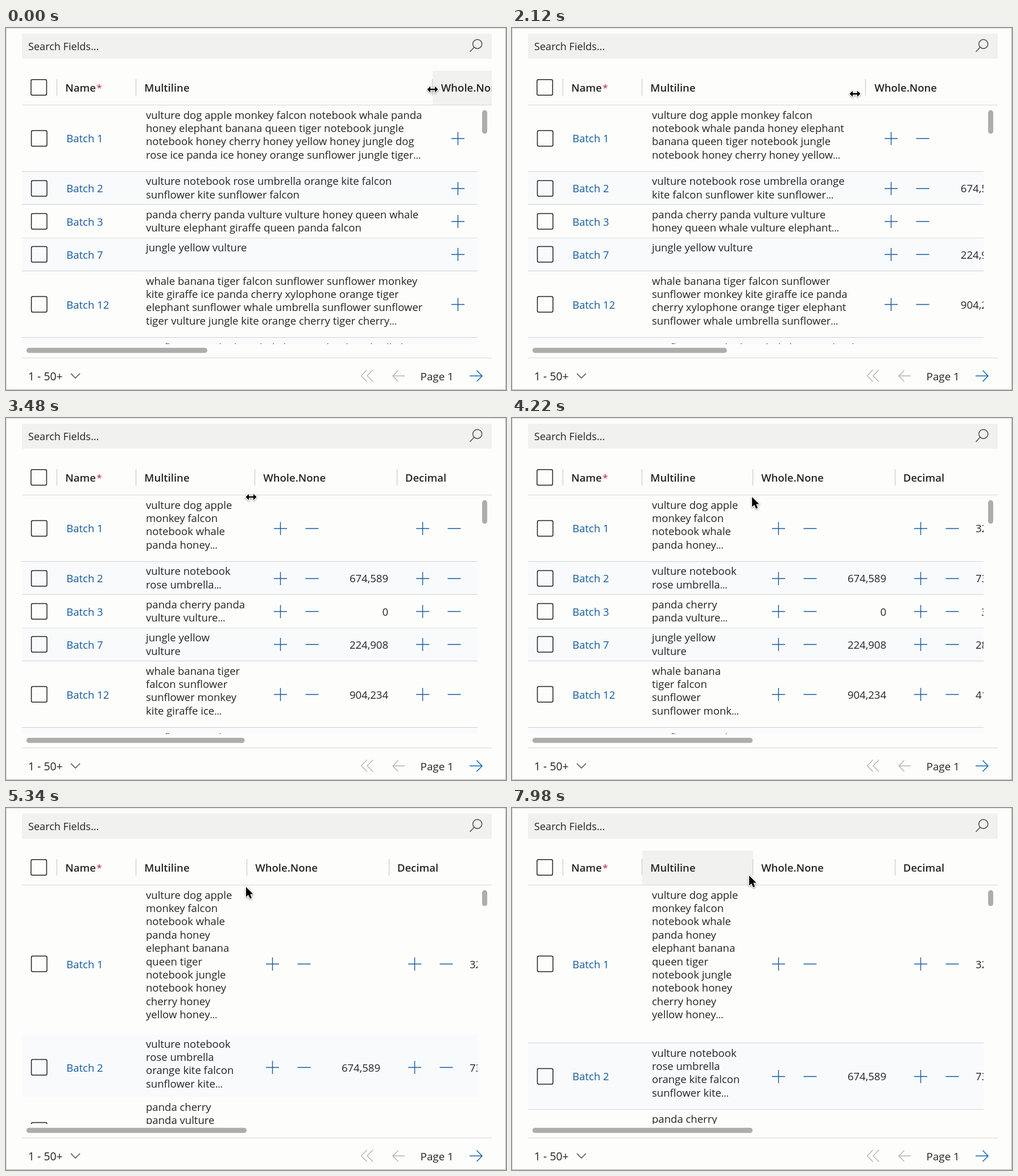
Write an HTML page with a canvas that moves like this. It is 879 px wide and 637 px high and loops after 8 s.

```html
<!DOCTYPE html>
<html lang="en">
<head>
<meta charset="utf-8">
<title>Resizable grid column</title>
<style>
  html, body { margin: 0; width: 100%; height: 100%; overflow: hidden; background: #fdfdfc; }
  canvas { display: block; }
</style>
</head>
<body>
<canvas id="stage" width="879" height="637"></canvas>
<script>
const ctx = document.getElementById('stage').getContext('2d');
const LOOP = 8000, EXPAND_AT = 4716, EXPAND_MS = 1000, ARROW_AT = 3950;
const INK = '#242424', BLUE = '#135a9e', GREY = '#b4b4b4', HOVER = '#f1f1ef';
const LINE = '#cdd3cf', THUMB = '#adadab';
const SIZE = 18.55, LEADING = 23.4, ROW_TOP = 136;
const font = (size = SIZE, weight = 400) => `${weight} ${size}px "Open Sans", "Noto Sans", sans-serif`;

// lines and height: [collapsed, expanded]
const rows = [
  { name: 'Batch 1', lines: [4, 10], height: [116.9, 278], whole: '', decimal: '32',
    words: 'vulture dog apple monkey falcon notebook whale panda honey elephant banana queen tiger notebook jungle notebook honey cherry honey yellow honey jungle dog rose ice panda ice honey orange sunflower jungle tiger umbrella notebook' },
  { name: 'Batch 2', lines: [2, 4], height: [58.4, 116.9], whole: '674,589', decimal: '73',
    words: 'vulture notebook rose umbrella orange kite falcon sunflower kite sunflower falcon' },
  { name: 'Batch 3', lines: [2, 4], height: [58.4, 116.9], whole: '0', decimal: '3', inset: 10,
    words: 'panda cherry panda vulture vulture honey queen whale vulture elephant giraffe queen panda falcon' },
  { name: 'Batch 7', lines: [2, 2], height: [58.4, 58.4], whole: '224,908', decimal: '28',
    words: 'jungle yellow vulture' },
  { name: 'Batch 12', lines: [4, 10], height: [116.9, 278], whole: '904,234', decimal: '41',
    words: 'whale banana tiger falcon sunflower sunflower monkey kite giraffe ice panda cherry xylophone orange tiger elephant sunflower whale umbrella sunflower sunflower tiger vulture jungle kite orange cherry tiger cherry sunflower notebook' },
  { name: 'Batch 14', lines: [4, 10], height: [116.9, 278], whole: '318,402', decimal: '56',
    words: 'sunflower jungle dog whale kite notebook umbrella kite yellow panda honey' }
];

// [time, x, y] of the pointer
const drag = [
  [1300, 750, 108], [1460, 731.5, 108], [1560, 712, 109], [2540, 521.5, 121],
  [2640, 509, 123], [3380, 437.5, 138], [3480, 431, 139], [3800, 423, 139],
  [3940, 422, 139], [7560, 422, 139], [7900, 417, 119]
];

function pointerAt(t) {
  if (t <= drag[0][0]) return drag[0].slice(1);
  for (let i = 1; i < drag.length; i++) {
    const [t0, x0, y0] = drag[i - 1], [t1, x1, y1] = drag[i];
    if (t <= t1) {
      const k = (t - t0) / (t1 - t0);
      return [x0 + (x1 - x0) * k, y0 + (y1 - y0) * k];
    }
  }
  return drag[drag.length - 1].slice(1);
}

// cubic-bezier(.25, .1, .25, 1)
function ease(x) {
  if (x <= 0) return 0;
  if (x >= 1) return 1;
  const curve = (s, a, b) => 3 * s * (1 - s) * (1 - s) * a + 3 * s * s * (1 - s) * b + s ** 3;
  let lo = 0, hi = 1;
  for (let i = 0; i < 24; i++) {
    const mid = (lo + hi) / 2;
    if (curve(mid, .25, .25) < x) lo = mid; else hi = mid;
  }
  return curve(lo, .1, 1);
}

function text(str, x, y, color = INK, f = font(), align = 'left') {
  ctx.font = f;
  ctx.fillStyle = color;
  ctx.textAlign = align;
  ctx.fillText(str, x, y);
}

function rect(x, y, w, h, color) {
  ctx.fillStyle = color;
  ctx.fillRect(x, y, w, h);
}

function path(color, width, ...lines) {
  ctx.beginPath();
  for (const pts of lines)
    for (let i = 0; i < pts.length; i += 2) ctx[i ? 'lineTo' : 'moveTo'](pts[i], pts[i + 1]);
  ctx.strokeStyle = color;
  ctx.lineWidth = width;
  ctx.stroke();
}

function pill(x, y, w, h) {
  ctx.beginPath();
  ctx.roundRect(x, y, w, h, Math.min(w, h) / 2);
  ctx.fillStyle = THUMB;
  ctx.fill();
}

function clipped(x, y, w, h, draw) {
  ctx.save();
  ctx.beginPath();
  ctx.rect(x, y, w, h);
  ctx.clip();
  draw();
  ctx.restore();
}

function checkbox(cx, cy) {
  ctx.beginPath();
  ctx.roundRect(cx - 13.7, cy - 13.7, 27.4, 27.4, 2.5);
  ctx.strokeStyle = '#222';
  ctx.lineWidth = 1.5;
  ctx.stroke();
}

function stepper(x, y) {
  path(BLUE, 1.4, [x + 34, y, x + 57, y], [x + 45.5, y - 11.5, x + 45.5, y + 11.5], [x + 89.5, y, x + 112.5, y]);
}

const measure = s => ctx.measureText(s).width;

function wrap(words, div, max) {
  ctx.font = font();
  const room = div - 14.5 - 246, lines = [];
  let line = '';
  for (const word of words.split(' ')) {
    const next = line ? line + ' ' + word : word;
    if (line && measure(next) > room) {
      lines.push(line);
      line = word;
    } else line = next;
  }
  lines.push(line);
  if (lines.length <= max) return { lines, cut: false };
  let last = lines[max - 1];
  while (last && measure(last) + 13.5 > room - 3) last = last.slice(0, -1);
  return { lines: [...lines.slice(0, max - 1), last], cut: true };
}

function drawRow(row, i, top, height, full, lineMax, div) {
  const mid = top + full / 2, rowY = Math.round(mid - .6) + .5, edge = Math.floor(div);
  if (i % 2) rect(28, top, 801, height, '#f8fafc');
  checkbox(58.3, rowY - .2);
  text(row.name, 106.2, mid + 7, BLUE);

  const { lines, cut } = wrap(row.words, div, lineMax);
  clipped(240, top, 589, 4.8 + lineMax * LEADING, () => {
    lines.forEach((line, n) => {
      const y = top + 23.5 + n * LEADING;
      text(line, 246, y);
      if (cut && n === lineMax - 1) text('…', 246 + measure(line), y, INK, font(16.5));
    });
  });

  stepper(edge, rowY);
  text(row.whole, div + 235, mid + 7, INK, font(), 'right');
  stepper(edge + 250, rowY);
  text(row.decimal, div + 392 + (row.inset || 0), mid + 7);
  const lineY = Math.round(top + full) - .5;
  path(LINE, 1.2, [28, lineY, 829, lineY]);
}

function drawGrid(t, div) {
  const open = t >= EXPAND_AT ? 1 : 0, p = ease((t - EXPAND_AT) / EXPAND_MS);
  clipped(28, ROW_TOP, 801, 420, () => {
    let top = ROW_TOP;
    rows.forEach((row, i) => {
      const [a, b] = row.height, height = a + (b - a) * p;
      if (top < 556)
        clipped(28, top, 801, height, () => drawRow(row, i, top, height, row.height[open], row.lines[open], div));
      top += height;
    });
  });
  pill(837, 144.6, 9, open ? 28 : 41.4);
  pill(36, 562.8, 581304 / (1079 + div), 9);
}

function drawHeader(t, div, pointerY) {
  const bold = font(SIZE, 600), edge = Math.floor(div);
  clipped(28, 70, 826, 66, () => {
    if (t < 420) rect(edge + 1, 75, 120, 60, HOVER);
    if (t > 7540 && pointerY < 134) rect(229, 75, edge - 228, 60, HOVER);
    checkbox(57.7, 104.5);
    for (const x of [89, 228, edge, edge + 250]) path('#cbcbcb', 1.2, [x + .5, 90, x + .5, 119]);
    text('Name', 104.2, 112.2, INK, bold);
    text('*', 159.3, 110.5, '#b3262e', font(17));
    text('Multiline', 243.3, 112.2, INK, bold);
    text('Whole.None', div + 15.2, 112.2, INK, bold);
    text('Decimal', div + 264.8, 112.2, INK, bold);
  });
  path('#d6dad2', 1.2, [28, 135.5, 854, 135.5]);
}

function drawChrome() {
  rect(0, 0, 879, 637, '#fdfdfc');
  rect(28, 10, 826, 44, HOVER);
  text('Search Fields...', 39, 39.4, INK, font(18.1));
  ctx.beginPath();
  ctx.arc(828.7, 28.2, 8, 0, 7);
  ctx.strokeStyle = '#444';
  ctx.lineWidth = 1.4;
  ctx.stroke();
  path('#444', 1.4, [823, 34, 815.5, 41.7]);

  path('#d6dad2', 1.2, [28, 580.5, 854, 580.5]);
  text('1 - 50+', 39, 619.5, INK, font(19.4));
  path('#444', 1.4, [114, 608, 122, 616, 130, 608]);
  path(GREY, 1.4, [634.5, 601.5, 624.5, 612, 634.5, 622.5], [645, 601.5, 635, 612, 645, 622.5]);
  path(GREY, 1.4, [689.5, 602.5, 680, 612.2, 689.5, 622], [680, 612.2, 701, 612.2]);
  text('Page 1', 728.6, 619.5, INK, font(18.8));
  path('#1167b1', 1.5, [827.5, 602.5, 837, 612.2, 827.5, 622], [815, 612.2, 837, 612.2]);

  rect(0, 0, 1, 637, '#d4d4d4');
  rect(0, 0, 879, 1, '#dcdcdc');
  rect(878, 0, 1, 637, '#b0b0b0');
  rect(0, 636, 879, 1, '#b0b0b0');
}

function drawPointer(t, x, y) {
  const shape = t < ARROW_AT
    ? [-9.5, 0, -4, -5.5, -4, -1.3, 4, -1.3, 4, -5.5, 9.5, 0, 4, 5.5, 4, 1.3, -4, 1.3, -4, 5.5]
    : [0, 0, 0, 17.5, 4, 13.8, 7, 20.5, 10, 19.2, 7.2, 12.6, 12.5, 12.4];
  ctx.save();
  ctx.translate(x, y);
  ctx.beginPath();
  for (let i = 0; i < shape.length; i += 2) ctx.lineTo(shape[i], shape[i + 1]);
  ctx.closePath();
  ctx.lineJoin = 'round';
  ctx.lineWidth = 2.5;
  ctx.strokeStyle = '#fff';
  ctx.shadowColor = 'rgba(0, 0, 0, .4)';
  ctx.shadowBlur = 3;
  ctx.shadowOffsetY = 1;
  ctx.stroke();
  ctx.shadowColor = 'transparent';
  ctx.fillStyle = '#000';
  ctx.fill();
  ctx.restore();
}

function frame(now) {
  const t = now % LOOP;
  const [x, y] = pointerAt(t);
  // the column edge trails the pointer by 100 ms
  const div = Math.max(423, pointerAt(t - 100)[0] - .4);
  drawChrome();
  drawGrid(t, div);
  drawHeader(t, div, y);
  drawPointer(t, x, y);
  requestAnimationFrame(frame);
}
requestAnimationFrame(frame);
</script>
</body>
</html>
```
